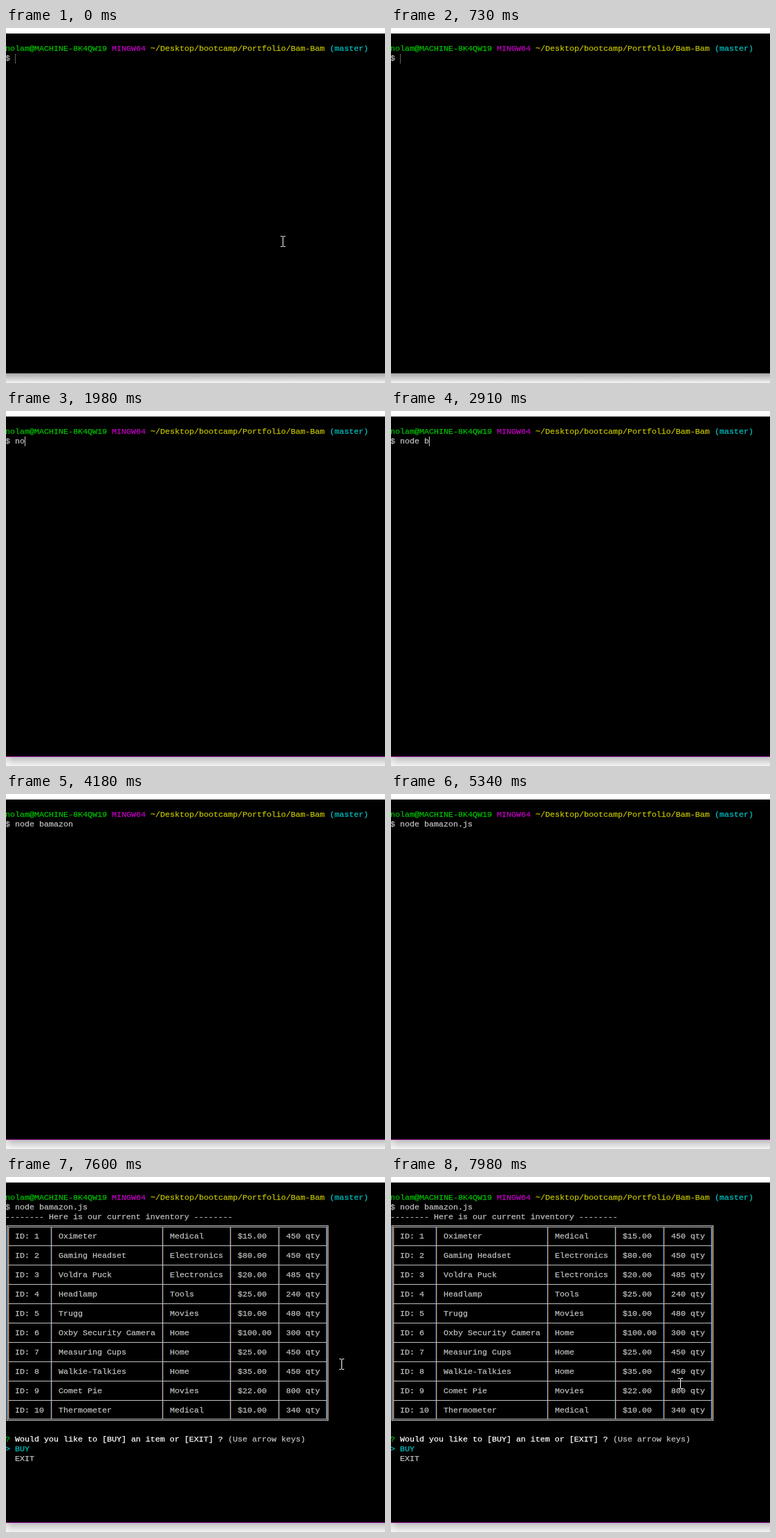
These frames come from a looping animation (548x514 px, 8 s). An HTML page with a canvas:

```html
<!DOCTYPE html>
<html lang="en">
<head>
<meta charset="utf-8">
<title>Terminal inventory</title>
<style>
  html, body { margin: 0; width: 100%; height: 100%; overflow: hidden; background: #fff; }
  canvas { display: block; }
</style>
</head>
<body>
<canvas id="stage" width="548" height="514"></canvas>
<script>
const ctx = document.getElementById('stage').getContext('2d', { alpha: false });
const LOOP = 8000, CELL_W = 7, CELL_H = 14, LEFT = -1, TOP = 23;
const COLOR = {
  gray: '#bfbfbf', white: '#ffffff', green: '#00bf00', magenta: '#bf00bf',
  yellow: '#bfbf00', cyan: '#00bfbf'
};

const COMMAND = 'node bamazon.js ';
// [time, characters shown]
const TYPING = [
  [1830, 1], [1910, 2], [2070, 3], [2150, 4], [2380, 5], [2910, 6], [2990, 7],
  [3140, 8], [3220, 9], [3450, 10], [3600, 11], [3680, 12], [4790, 16]
];
const CARET_ON = [[1030, 1580], [1830, 4180], [4710, 5340]];
const FOCUS = 1030, TABLE = 6670, MENU = 6740;

// [time, x, y]; without a position the pointer is off stage
const POINTER = [
  [0, 400, 309], [500, 412, 313], [580, 450, 316], [660, 513, 296], [730],
  [7600, 485, 271], [7670, 455, 276], [7750, 430, 284],
  [7830, 414, 291], [7900, 412, 296], [7980, 418, 299]
];

const ITEMS = [
  ['Oximeter', 'Medical', '$15.00', 450],
  ['Gaming Headset', 'Electronics', '$80.00', 450],
  ['Voldra Puck', 'Electronics', '$20.00', 485],
  ['Headlamp', 'Tools', '$25.00', 240],
  ['Trugg', 'Movies', '$10.00', 480],
  ['Oxby Security Camera', 'Home', '$100.00', 300],
  ['Measuring Cups', 'Home', '$25.00', 450],
  ['Walkie-Talkies', 'Home', '$35.00', 450],
  ['Comet Pie', 'Movies', '$22.00', 800],
  ['Thermometer', 'Medical', '$10.00', 340]
];
const TEXT_COLUMNS = [2, 11, 34, 48, 58];

const latest = (steps, t) => steps.filter(step => step[0] <= t).pop();

function rect(color, x, y, w, h) {
  ctx.fillStyle = color;
  ctx.fillRect(x, y, w, h);
}

function print(text, col, row, color = COLOR.gray) {
  const x = LEFT + col * CELL_W, y = TOP + row * CELL_H + 10;
  ctx.fillStyle = ctx.strokeStyle = color;
  ctx.fillText(text, x, y);
  ctx.strokeText(text, x, y);
}

function gradient(x, y, dx, dy, from, to) {
  const g = ctx.createLinearGradient(x, y, x + dx, y + dy);
  g.addColorStop(0, from);
  g.addColorStop(1, to);
  return g;
}

function drawWindow(focused) {
  rect('#fff', 0, 0, 548, 514);
  rect('#000', 0, 8, 548, 492);
  const shade = focused ? '#bcbcbc' : '#a4a4a4';
  rect(gradient(0, 500, 0, 14, shade, '#f4f4f4'), 0, 500, 548, 14);
  if (focused) {
    rect(gradient(0, 0, 10, 0, 'rgba(255,255,255,.4)', 'rgba(255,255,255,0)'), 0, 501, 10, 13);
    rect('#a020a0', 0, 500, 548, 1);
  }
}

function drawPrompt(t) {
  print('nolam@MACHINE-8K4QW19', 0, 0, COLOR.green);
  print('MINGW64', 22, 0, COLOR.magenta);
  print('~/Desktop/bootcamp/Portfolio/Bam-Bam', 30, 0, COLOR.yellow);
  print('(master)', 67, 0, COLOR.cyan);
  const typed = (latest(TYPING, t) || [0, 0])[1];
  print('$', 0, 1);
  print(COMMAND.slice(0, typed), 2, 1);

  const x = LEFT + (2 + typed) * CELL_W;
  if (t < FOCUS) {
    for (let y = 38; y < 51; y += 2) rect(COLOR.gray, x, y, 1, 1);
  } else if (CARET_ON.some(([on, off]) => t >= on && t < off)) {
    rect(COLOR.gray, x, 37, 1, 14);
  }
}

// A vertical rule with subpixel fringes: blue on its left, red on its right.
function drawRule(x, y, height) {
  ctx.globalCompositeOperation = 'lighter';
  rect('#002060', x - 1, y, 1, height);
  rect('#a0bfa0', x, y, 1, height);
  rect('#602000', x + 1, y, 1, height);
  ctx.globalCompositeOperation = 'source-over';
}

function drawTable() {
  print('-------- Here is our current inventory --------', 0, 2);
  for (const x of [65, 226, 324, 394]) drawRule(x, 73, 277);
  for (const x of [1, 463]) {
    const outer = x === 1 ? 1 : 465, inner = x === 1 ? 3 : 463;
    drawRule(outer, 70, 283);
    drawRule(inner, 72, 279);
  }
  ITEMS.forEach((item, i) => {
    const cells = ['ID: ' + (i + 1), ...item.slice(0, 3), item[3] + ' qty'];
    cells.forEach((cell, c) => print(cell, TEXT_COLUMNS[c], 4 + 2 * i));
    if (i) rect(COLOR.gray, 3, 71 + 28 * i, 461, 1);
  });
  for (const y of [70, 352]) rect(COLOR.gray, 1, y, 465, 1);
  for (const y of [72, 350]) rect(COLOR.gray, 3, y, 461, 1);
}

function drawMenu() {
  print('?', 0, 25, COLOR.green);
  print('Would you like to [BUY] an item or [EXIT] ?', 2, 25, COLOR.white);
  print('(Use arrow keys)', 46, 25);
  print('> BUY', 0, 26, COLOR.cyan);
  print('EXIT', 2, 27);
}

function drawPointer(t) {
  const [, x, y] = latest(POINTER, t);
  if (x === undefined) return;
  rect(COLOR.white, x, y - 7, 1, 14);
  for (const edge of [y - 8, y + 7]) {
    rect(COLOR.white, x - 3, edge, 3, 1);
    rect(COLOR.white, x + 1, edge, 3, 1);
  }
}

function draw(t) {
  // A cell is 7px wide and the font's advance is 0.6em.
  ctx.font = CELL_W / 0.6 + 'px "Liberation Mono", monospace';
  ctx.lineWidth = 0.25;
  drawWindow(t >= FOCUS);
  drawPrompt(t);
  if (t >= TABLE) drawTable();
  if (t >= MENU) drawMenu();
  drawPointer(t);
}

const start = performance.now();
function tick() {
  draw((performance.now() - start) % LOOP);
  requestAnimationFrame(tick);
}
tick();
</script>
</body>
</html>
```
